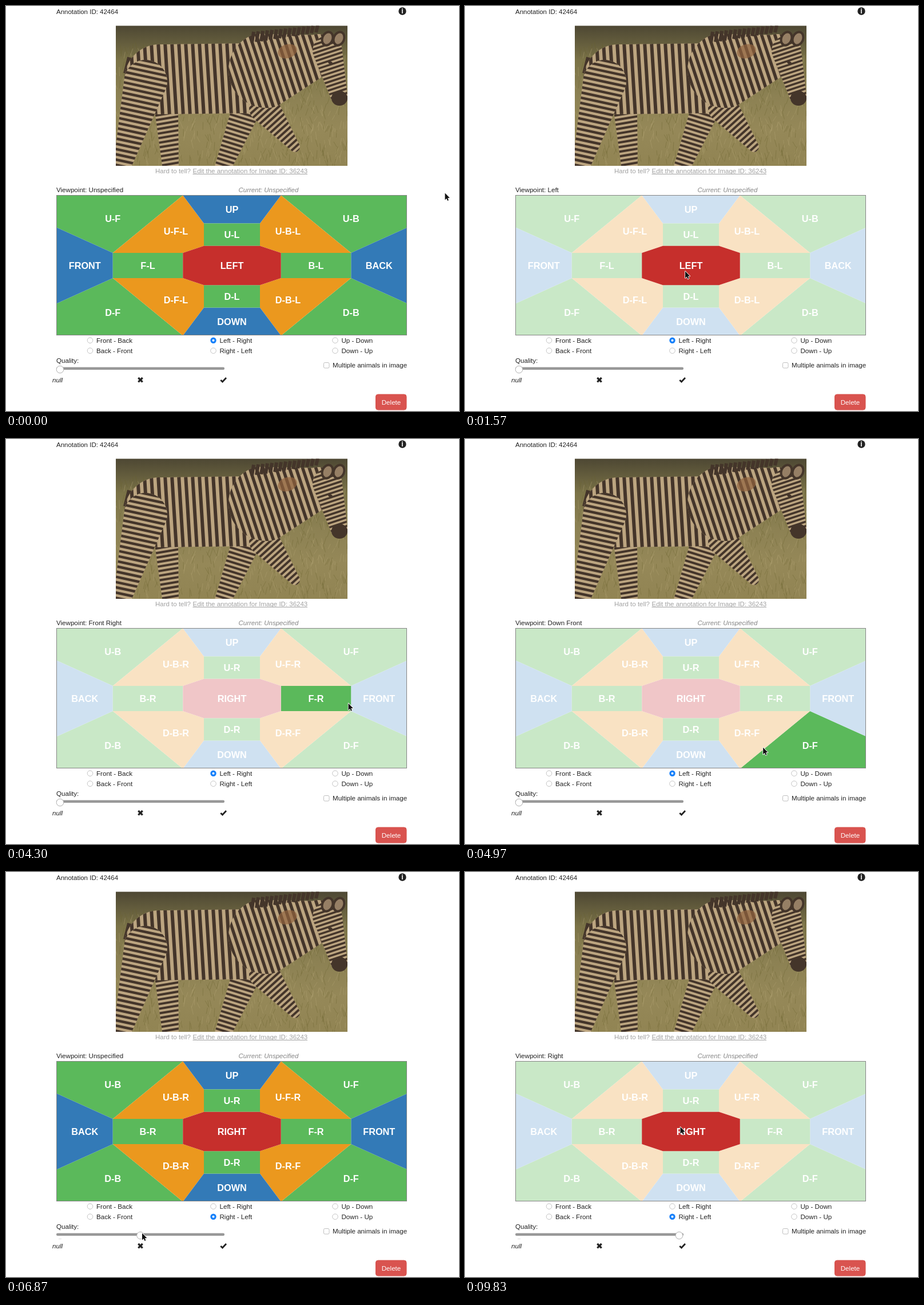
Recreate the animation shown at these times as an HTML page with a canvas. Size 792 px wide and 707 px high, loop 9.87 s.

```html
<!DOCTYPE html>
<html lang="en">
<head>
<meta charset="utf-8">
<title>Viewpoint annotation</title>
<style>
  html, body { margin: 0; width: 100%; height: 100%; overflow: hidden; background: #fff; }
  canvas { display: block; }
</style>
</head>
<body>
<canvas id="stage" width="792" height="707"></canvas>
<script>
const W = 792, H = 707, LOOP = 9870, HOVER_LAG = 60;
const FLIP_AT = 2030, RADIO_AT = 6170, SLIDE_AT = 6800, SLIDE_END = 7400;
const ctx = document.getElementById('stage').getContext('2d');
const SANS = '"Liberation Sans", Arial, sans-serif';

const HOME = [767.5, 326.5];
// Eased cursor moves: start, end, x, y.
const MOVES = [
  [70, 530, 640, 372], [800, 1500, 385, 463], [3130, 3630, 462, 506.5],
  [3630, 4100, 600, 450], [4130, 4850, 590, 530], [4850, 5090, 454, 547],
  [5130, 6020, 364, 603], [6170, 6800, 238, 630.5], [7100, 7670, 376, 637],
  [7970, 8230, 329, 420], [8230, 8930, 485, 400], [8970, 9450, 376.5, 445]
];

function cursorAt(t) {
  let [x, y] = HOME;
  for (const [from, to, tx, ty] of MOVES) {
    if (t < from) break;
    const u = Math.min(1, (t - from) / (to - from)), s = u * u * (3 - 2 * u);
    x += (tx - x) * s;
    y += (ty - y) * s;
  }
  return [x, y];
}

const COLORS = {
  green: ['#5bb95b', '#c9e8c7'], blue: ['#337ab7', '#cfe1f1'],
  orange: ['#eb981e', '#f9e2c3'], red: ['#c62f2c', '#f0c6c8']
};
const CENTER = [395, 453], UNIT = 12.25;

function polygon(points) {
  const p = new Path2D();
  points.forEach(([x, y]) => p.lineTo(x, y));
  p.closePath();
  return p;
}

// Regions are given in map units for one quadrant and mirrored by sx, sy.
const REGIONS = [];
function region(label, flipped, color, sx, sy, anchor, points) {
  const place = ([x, y]) => [CENTER[0] + x * sx * UNIT, CENTER[1] + y * sy * UNIT];
  const [x, y] = place(anchor);
  REGIONS.push({ label, flipped, color, x, y, path: polygon(points.map(place)) });
}

function buildMap() {
  const box = (x0, y0, x1, y1) => [[x0, y0], [x1, y0], [x1, y1], [x0, y1]];
  const ends = { F: 'FRONT', B: 'BACK', U: 'UP', D: 'DOWN' };
  for (const [v, sy] of [['U', -1], ['D', 1]]) {
    for (const [s, o, sx] of [['F', 'B', -1], ['B', 'F', 1]]) {
      const diagonal = v + s === 'DB' ? 'D-R-F' : `${v}-${o}-R`;
      region(`${v}-${s}`, `${v}-${o}`, 'green', sx, sy, [17, 6.7],
        [[25, 10], [7, 10], [17, 1.8], [25, 5.4]]);
      region(`${v}-${s}-L`, diagonal, 'orange', sx, sy, [8, 4.9],
        [[7, 10], [4, 6], [4, 2.8], [7, 1.8], [17, 1.8]]);
    }
    region(ends[v], ends[v], 'blue', 1, sy, [0, 8], [[-7, 10], [7, 10], [4, 6], [-4, 6]]);
    region(`${v}-L`, `${v}-R`, 'green', 1, sy, [0, 4.4], box(-4, 2.8, 4, 6));
  }
  for (const [s, o, sx] of [['F', 'B', -1], ['B', 'F', 1]]) {
    region(ends[s], ends[o], 'blue', sx, 1, [21, 0],
      [[25, 5.4], [17, 1.8], [17, -1.8], [25, -5.4]]);
    region(`${s}-L`, `${o}-R`, 'green', sx, 1, [12, 0], box(7, -1.8, 17, 1.8));
  }
  const half = [[-7, 1.8], [-4, 2.8], [4, 2.8], [7, 1.8]];
  region('LEFT', 'RIGHT', 'red', 1, 1, [0, 0],
    [...half, ...half.map(([x, y]) => [-x, -y])]);
}

const WORDS = { U: 'Up', D: 'Down', F: 'Front', B: 'Back', L: 'Left', R: 'Right' };
const viewpointName = label => label.includes('-')
  ? label.split('-').map(c => WORDS[c]).join(' ')
  : label[0] + label.slice(1).toLowerCase();

function text(str, x, y, { size = 11.6, style = '', color = '#222', align = 'left' } = {}) {
  ctx.font = `${style} ${size}px ${SANS}`;
  ctx.fillStyle = color;
  ctx.textAlign = align;
  ctx.fillText(str, x, y);
}

function circle(x, y, r, fill, stroke) {
  ctx.beginPath();
  ctx.arc(x, y, r, 0, Math.PI * 2);
  ctx.fillStyle = fill;
  ctx.fill();
  if (stroke) { ctx.strokeStyle = stroke; ctx.lineWidth = 1; ctx.stroke(); }
}

function rounded(x, y, w, h, r, fill, stroke) {
  ctx.beginPath();
  ctx.roundRect(x, y, w, h, r);
  ctx.fillStyle = fill;
  ctx.fill();
  if (stroke) { ctx.strokeStyle = stroke; ctx.lineWidth = 1; ctx.stroke(); }
}

function polyline(points, color, width) {
  ctx.beginPath();
  points.forEach(([x, y]) => ctx.lineTo(x, y));
  ctx.strokeStyle = color;
  ctx.lineWidth = width;
  ctx.stroke();
}

function paintPhoto() {
  const layer = document.createElement('canvas');
  layer.width = W;
  layer.height = 300;
  const g = layer.getContext('2d');
  const dark = '#44352a', cream = '#bca580';
  let seed = 7;
  const rnd = () => (seed = (seed * 16807) % 2147483647) / 2147483647;

  g.beginPath();
  g.rect(192, 34.5, 405, 244.5);
  g.clip();
  const field = g.createLinearGradient(0, 34, 0, 279);
  ['#4d4733', '#7b7347', '#8c8153', '#958858', '#918453']
    .forEach((c, i) => field.addColorStop(i / 4, c));
  g.fillStyle = field;
  g.fillRect(192, 34, 405, 246);

  const line = (x, y, ex, ey, color, width) => {
    g.beginPath();
    g.moveTo(x, y);
    g.lineTo(ex, ey);
    g.strokeStyle = color;
    g.lineWidth = width;
    g.stroke();
  };
  g.globalAlpha = .4;
  for (let i = 0; i < 900; i++) {
    const x = 190 + rnd() * 410, y = 75 + rnd() * 210;
    line(x, y, x + rnd() * 12 - 6, y - 8 - rnd() * 8, i % 2 ? '#b5a675' : '#69612f', 1);
  }
  g.globalAlpha = 1;

  // A tapered, round-ended part with evenly spaced stripes across its axis.
  const limb = (x0, y0, w0, x1, y1, w1, step) => {
    const length = Math.hypot(x1 - x0, y1 - y0), r0 = w0 / 2, r1 = w1 / 2;
    g.save();
    g.translate(x0, y0);
    g.rotate(Math.atan2(y1 - y0, x1 - x0));
    g.beginPath();
    g.arc(0, 0, r0, Math.PI / 2, Math.PI * 1.5);
    g.arc(length, 0, r1, -Math.PI / 2, Math.PI / 2);
    g.closePath();
    g.clip();
    g.fillStyle = cream;
    g.fillRect(-r0, -r0, length + r0 + r1, w0);
    for (let x = -r0; x < length + r1; x += step) line(x, -r0, x + step / 2, r0, dark, step / 2);
    g.restore();
  };
  line(217, 90, 210, 118, dark, 10);
  limb(280, 175, 42, 288, 285, 28, 8);
  limb(420, 180, 50, 378, 285, 28, 8);
  limb(268, 128, 122, 424, 126, 128, 12);
  limb(244, 132, 76, 200, 290, 28, 9);
  limb(452, 178, 54, 505, 246, 18, 8);
  limb(455, 112, 132, 546, 86, 74, 11);
  limb(562, 78, 52, 582, 156, 30, 7);

  g.fillStyle = dark;
  g.beginPath();
  g.ellipse(583, 161, 14, 13, 0, 0, 7);
  g.ellipse(567, 99, 4, 2.5, .4, 0, 7);
  g.fill();
  for (let x = 430; x < 550; x += 8) line(x, 64 - (x - 430) * .16, x + 3, 45 - (x - 430) * .1, dark, 6);
  for (const x of [562, 582]) {
    g.beginPath();
    g.ellipse(x, 57, 9, 12, .4, 0, 7);
    g.fillStyle = '#967f65';
    g.fill();
    g.strokeStyle = dark;
    g.lineWidth = 4;
    g.stroke();
  }
  g.beginPath();
  g.ellipse(492, 79, 17, 12, -.3, 0, 7);
  g.fillStyle = '#93653fb0';
  g.fill();
  return layer;
}

function drawMap(hovered, flipped) {
  const key = flipped ? 'flipped' : 'label';
  ctx.save();
  ctx.beginPath();
  ctx.rect(88, 330, 612.5, 244.5);
  ctx.clip();
  for (const r of REGIONS) {
    ctx.fillStyle = COLORS[r.color][hovered && r !== hovered ? 1 : 0];
    ctx.fill(r.path);
  }
  ctx.restore();
  for (const r of REGIONS)
    text(r[key], r.x, r.y + 6, { size: 16.3, style: 'bold', color: '#fff', align: 'center' });
  ctx.strokeStyle = '#858585';
  ctx.lineWidth = 1;
  ctx.strokeRect(88.5, 330.5, 612, 244);
}

function drawRadios(selected) {
  const names = ['Front - Back', 'Back - Front', 'Left - Right', 'Right - Left', 'Up - Down', 'Down - Up'];
  names.forEach((name, i) => {
    const x = [147, 362.5, 575.5][i >> 1], y = 583.7 + (i % 2) * 18;
    if (name === selected) {
      circle(x, y, 5.2, '#1680fa');
      circle(x, y, 2, '#fff');
    } else {
      circle(x, y, 4.8, '#fff', '#c4c4c4');
    }
    text(name, x + 11, y + 4.3);
  });
}

function drawSlider(t) {
  text('Quality:', 88, 623);
  rounded(88, 630.5, 294, 4.5, 2, '#989898');
  if (t >= SLIDE_AT) polyline([[92, 640.5], [97, 640.5]], '#ddd', 1);
  circle(t < SLIDE_AT ? 94.5 : t < SLIDE_END ? 235 : 374.5, 634.5, 6.3, '#fff', '#b0b0b0');
  text('null', 81, 657, { style: 'italic' });
  for (const s of [-1, 1])
    polyline([[235 - 3.7 * s, 649], [235 + 3.7 * s, 656.4]], '#222', 3.2);
  polyline([[375.3, 653], [378.5, 656], [385, 649]], '#222', 2.8);
}

function drawInfoIcon() {
  circle(693, 9, 6.7, '#222');
  text('i', 693, 13, { size: 12, style: 'bold', color: '#fff', align: 'center' });
}

function drawPage(t, hovered, flipped) {
  text('Annotation ID: 42464', 88, 14, { size: 11.5 });
  drawInfoIcon();

  ctx.drawImage(photo, 0, 0);
  const faint = { size: 11.5, color: '#a2a2a2' };
  text('Hard to tell? ', 261, 291.5, faint);
  text('Edit the annotation for Image ID: 36243', 326.5, 291.5, faint);
  polyline([[326.5, 293.5], [527, 293.5]], '#a2a2a2', 1);

  const name = hovered ? viewpointName(flipped ? hovered.flipped : hovered.label) : 'Unspecified';
  text(`Viewpoint: ${name}`, 88, 325);
  text('Current: Unspecified', 406.5, 324.5, { size: 11.5, style: 'italic', color: '#858585' });
  drawMap(hovered, flipped);
  drawRadios(t < RADIO_AT ? 'Left - Right' : 'Right - Left');
  drawSlider(t);

  rounded(555.5, 622.5, 9.5, 9.5, 2, '#fff', '#c0c0c0');
  text('Multiple animals in image', 571, 631);
  rounded(646.5, 678, 53.5, 27, 4, '#d9534f', '#d5504b');
  text('Delete', 673.5, 695.5, { color: '#fff', align: 'center' });
}

const ARROW = polygon([[0, 0], [0, 12], [2.7, 9.4], [4.5, 13.4], [6.4, 12.6], [4.7, 8.7], [8.3, 8.5]]);

function drawCursor([x, y]) {
  ctx.save();
  ctx.translate(x, y);
  ctx.strokeStyle = '#fff';
  ctx.lineWidth = 1.6;
  ctx.lineJoin = 'round';
  ctx.stroke(ARROW);
  ctx.fillStyle = '#111';
  ctx.fill(ARROW);
  ctx.restore();
}

buildMap();
const photo = paintPhoto();
const start = performance.now();

function frame() {
  const t = Math.max(0, performance.now() - start) % LOOP;
  const [hx, hy] = cursorAt(t - HOVER_LAG);
  const hovered = REGIONS.find(r => ctx.isPointInPath(r.path, hx, hy));
  ctx.fillStyle = '#fff';
  ctx.fillRect(0, 0, W, H);
  drawPage(t, hovered, t >= FLIP_AT);
  drawCursor(cursorAt(t));
  requestAnimationFrame(frame);
}
frame();
</script>
</body>
</html>
```
